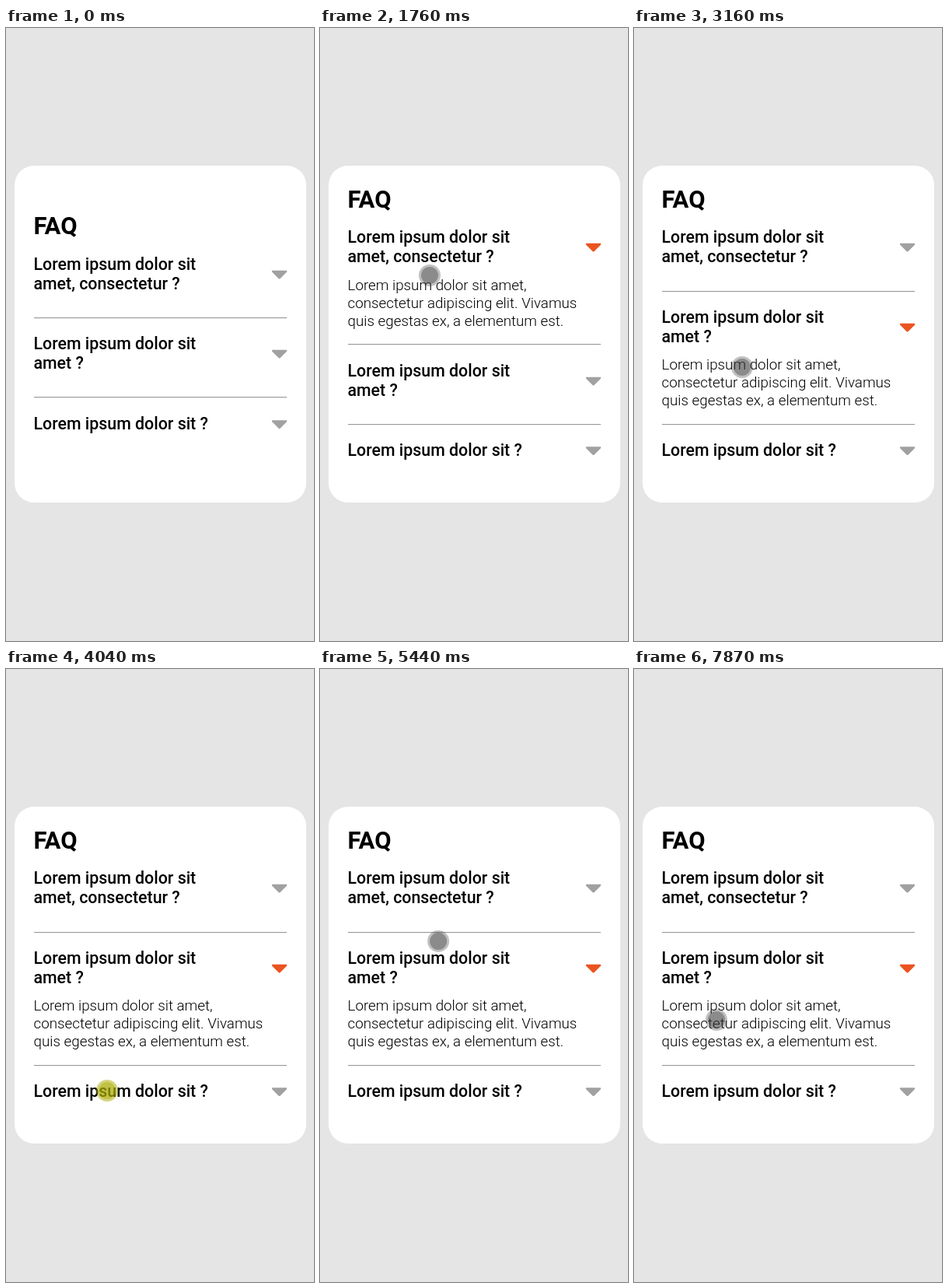
Write an HTML page that moves like this. It is 396 px wide and 788 px high and loops after 8 s.

```html
<!DOCTYPE html>
<html lang="en">
<head>
<meta charset="utf-8">
<title>FAQ accordion</title>
<style>
  html, body { margin: 0; width: 100%; height: 100%; overflow: hidden; background: #e5e5e5; }
  #stage { display: block; width: 396px; height: 788px; font-family: Roboto, sans-serif; }
  .title { font-size: 31px; font-weight: 700; }
  .question { font-size: 21.33px; font-weight: 500; }
  .answer { font-size: 18.77px; font-weight: 300; }
</style>
</head>
<body>
<svg id="stage" viewBox="0 0 396 788">
  <rect width="396" height="788" fill="#e5e5e5"/>
  <rect x="11" y="177" width="375" height="433" rx="25" fill="#fff"/>
  <text id="title" class="title" x="35.5">FAQ</text>
  <g id="list"></g>
  <g id="cursor"><circle r="14"/><circle r="11"/></g>
</svg>
<script>
const LOOP = 8000, ANSWER_H = 68.6, LINE = 25;
const PRESS = 140, DELAY = 70, SLIDE = 140;
const questions = [
  ["Lorem ipsum dolor sit", "amet, consectetur ?"],
  ["Lorem ipsum dolor sit", "amet ?"],
  ["Lorem ipsum dolor sit ?"]
];
const answer = ["Lorem ipsum dolor sit amet,", "consectetur adipiscing elit. Vivamus", "quis egestas ex, a elementum est."];

// The cursor enters along a curve, then visits each stop and clicks an item there.
const entry = { from: 330, to: 1090, x: [336, 200, 380, 187], y: [666, 430, 200, 310] };
const stops = [
  { from: 1090, to: 1360, x: 141, y: 318, click: 1500, item: 0 },
  { from: 2160, to: 2620, x: 139, y: 436, click: 2820, item: 1 },
  { from: 3310, to: 3840, x: 130, y: 542, click: 4040, item: 2 },
  { from: 4280, to: 4700, x: 153, y: 363, click: 4900, item: 1 },
  { from: 5380, to: 6190, x: 147, y: 273, click: 6250, item: 0 },
  { from: 6990, to: 7520, x: 106, y: 451, click: 7660, item: 1 }
];

const $ = id => document.getElementById(id);
const clamp = v => Math.max(0, Math.min(1, v));
const easeOut = p => 1 - (1 - p) ** 2;
const progress = (t, from, to) => easeOut(clamp((t - from) / (to - from)));
const mix = (a, b, p) => a + (b - a) * p;
const bezier = ([a, b, c, d], p) => {
  const q = 1 - p;
  return a * q ** 3 + 3 * b * q * q * p + 3 * c * q * p * p + d * p ** 3;
};
const texts = (lines, cls, x, y, step) =>
  lines.map((s, i) => `<text class="${cls}" x="${x}" y="${y + i * step}">${s}</text>`).join("");

const caret = "M20 0H300c18 0 12 24 3 34L174 163c-8 8-20 8-28 0L17 34C8 24 2 0 20 0Z";
const rule = '<g class="rule"><path d="M36 .5H361" stroke="#9a9a9a"/><path d="M36 1.5H361" stroke="#eee"/></g>';

$("list").innerHTML = questions.map((q, i) => `
  <g>
    ${texts(q, "question", 35.5, 0, LINE)}
    <path class="arrow" d="${caret}" transform="translate(341.3 ${q.length * LINE / 2 - 24.3}) scale(.064)"/>
    ${i < questions.length - 1 ? rule : ""}
  </g>
  <svg x="35.5" width="326">${texts(answer, "answer", 0, 18, 23)}</svg>`).join("");

const items = [...$("list").querySelectorAll(":scope > g")].map(g => ({
  g,
  arrow: g.querySelector(".arrow"),
  rule: g.querySelector(".rule"),
  panel: g.nextElementSibling
}));

function openness(t) {
  let open = questions.map(() => 0);
  for (const { click, item } of stops) {
    const p = progress(t, click + DELAY, click + DELAY + SLIDE);
    open = open.map((v, i) => mix(v, i === item ? 1 : 0, p));
  }
  return open;
}

function cursorAt(t) {
  const p = progress(t, entry.from, entry.to);
  let x = bezier(entry.x, p), y = bezier(entry.y, p);
  for (const s of stops) {
    const p = progress(t, s.from, s.to);
    x = mix(x, s.x, p);
    y = mix(y, s.y, p);
  }
  return [x, y];
}

function drawList(t) {
  const open = openness(t);
  const shift = (1 - open[0] - open[1] - open[2]) * ANSWER_H / 2;
  $("title").setAttribute("y", Math.round(230.9 + shift));
  let base = 276.4 + shift;
  items.forEach(({ g, arrow, rule, panel }, i) => {
    const extra = open[i] * ANSWER_H, y = Math.round(base);
    const textH = questions[i].length * LINE;
    g.setAttribute("transform", `translate(0 ${y})`);
    arrow.setAttribute("fill", `rgb(${[235, 84, 32].map(c => mix(161, c, open[i]))})`);
    panel.setAttribute("y", Math.round(base + textH - 7.5));
    panel.setAttribute("height", extra);
    if (rule) rule.setAttribute("transform", `translate(0 ${Math.round(base + 61.2 + extra) - y})`);
    base += textH + 52.5 + extra;
  });
}

function drawCursor(t) {
  const cursor = $("cursor"), [ring, core] = cursor.children;
  const pressed = stops.some(s => t >= s.click && t < s.click + PRESS);
  cursor.style.display = t < entry.from ? "none" : "";
  cursor.setAttribute("transform", `translate(${cursorAt(t)})`);
  cursor.setAttribute("fill", pressed ? "rgb(170,170,0)" : "rgb(60,60,60)");
  ring.setAttribute("opacity", pressed ? .5 : .32);
  core.setAttribute("opacity", pressed ? .45 : .4);
}

function frame(now) {
  const t = now % LOOP;
  drawList(t);
  drawCursor(t);
  requestAnimationFrame(frame);
}
requestAnimationFrame(frame);
</script>
</body>
</html>
```
